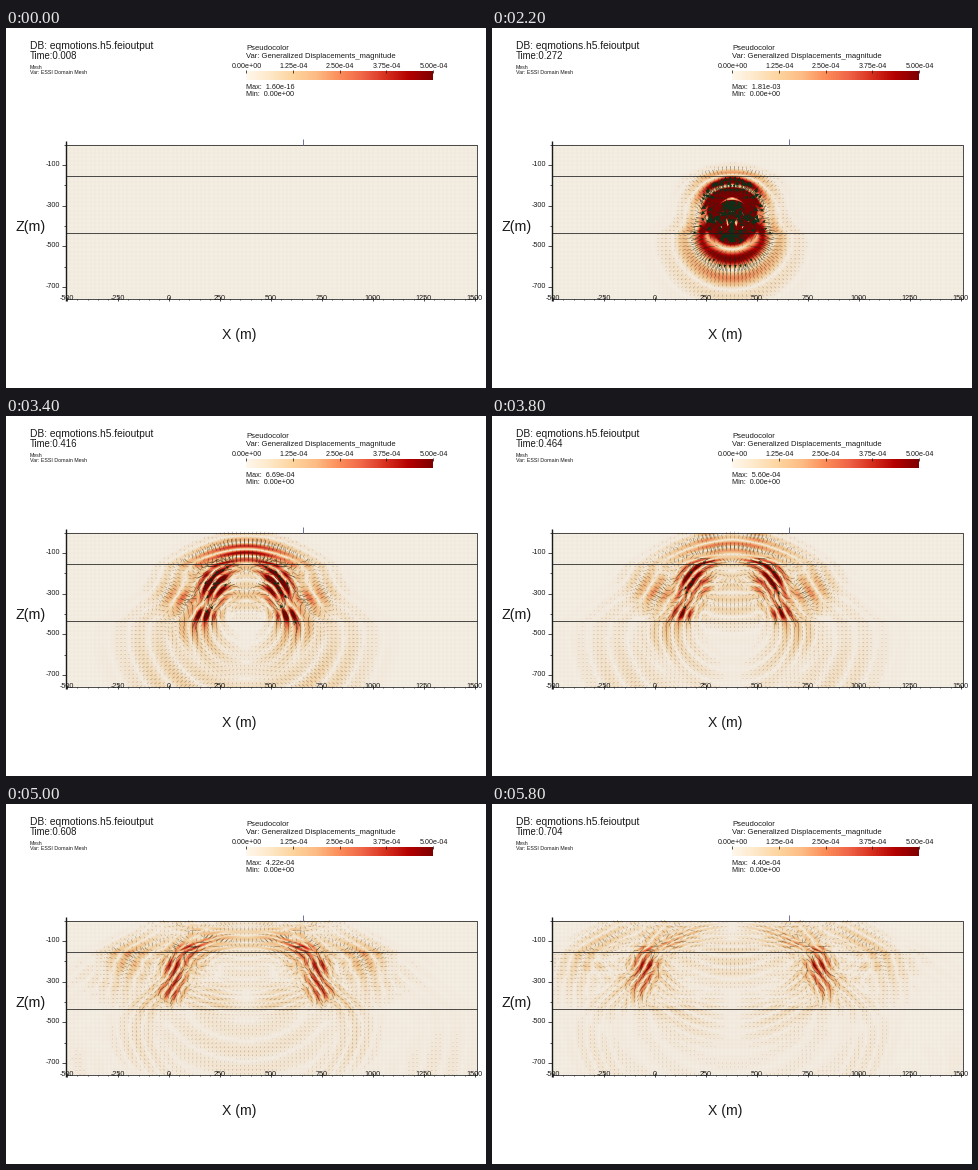
A matplotlib script for the animation above (6 s loop, 480 px wide and 360 px high).

```python
import numpy as np
import matplotlib.pyplot as plt
from matplotlib.animation import FuncAnimation
from matplotlib.collections import LineCollection, PolyCollection

W, H, DPI = 480, 360, 100
FRAMES, STEP_MS = 30, 200
X0, X1, Y0, Y1 = 60, 471, 117, 271      # section, in pixels
LAYERS = (147.5, 205)                   # depths of the interfaces
SRC = (239.5, 192)
NX, NZ, PAD = X1 - X0, Y1 - Y0, 30
SUB = 20                                # solver steps per frame
VMAX = 5e-4
CMAP = plt.get_cmap("OrRd")
INK = "#1a1a1a"

# peak displacement over time, interpolated in log space
PEAK_T = [0, 1, 2, 4, 7, 11, 15, 19, 25, 29]
PEAK_V = [1.6e-16, 4.2e-6, 5.1e-5, 6.3e-4, 1.99e-3, 1.81e-3,
          7.99e-4, 5.6e-4, 4.22e-4, 4.4e-4]


def peak(n):
    return np.exp(np.interp(n, PEAK_T, np.log(PEAK_V)))


def fwd(a, axis):
    return np.roll(a, -1, axis) - a


def back(a, axis):
    return a - np.roll(a, 1, axis)


def simulate():
    """Elastic waves in three layers under a free surface (staggered grid)."""
    rows, cols = NZ + PAD, NX + 2 * PAD
    z, x = np.mgrid[:rows, :cols].astype(np.float32)
    py, px = z + Y0, x + X0 - PAD

    def layered(top, mid, low):
        zones = [py < LAYERS[0], py < LAYERS[1]]
        return np.select(zones, [top, mid], low).astype(np.float32)

    stiff = layered(4.6, 7.8, 13.0) ** 2
    mu = layered(2.5, 4.7, 7.5) ** 2
    keep = 1 - layered(0.25, 0.0, 0.15) / SUB
    lam = stiff - 2 * mu
    top = (4 * mu * (lam + mu) / stiff)[0]

    blob = np.exp(-((px - SRC[0]) / 2.4) ** 2 / 2
                  - ((py - SRC[1]) / 2.8) ** 2 / 2)
    edge = np.maximum.reduce([PAD - x, x - (cols - 1 - PAD),
                              z - NZ, np.zeros_like(z)])
    sponge = np.exp(-(0.01 * edge) ** 2)

    ux, uz, ox, oz = (np.zeros((rows, cols), np.float32) for _ in range(4))
    dt2 = np.float32(1 / SUB ** 2)
    shots = []
    for k in range((FRAMES - 1) * SUB + 1):
        if k % SUB == 0:
            cx = (ux + np.roll(ux, 1, 1)) / 2
            cz = (uz + np.roll(uz, 1, 0)) / 2
            cz[0] = uz[0]
            shots.append((cx[:NZ, PAD:-PAD].copy(), cz[:NZ, PAD:-PAD].copy()))
        t = k / SUB - 7.6
        pulse = np.float32(np.cos(2 * np.pi * t / 3)
                           * np.exp(-(t / 1.8) ** 2 / 2))
        exx, ezz = back(ux, 1), back(uz, 0)
        sxx = stiff * exx + lam * ezz - 0.1 * pulse * blob
        szz = lam * exx + stiff * ezz - pulse * blob
        sxx[0], szz[0] = top * exx[0], 0
        sxz = mu * (fwd(ux, 0) + fwd(uz, 1))
        sxz[-1] = 0
        ax = fwd(sxx, 1) + back(sxz, 0)
        ax[0] += sxz[0]
        az = back(sxz, 1) + fwd(szz, 0)
        nx = ux + keep * (ux - ox) + dt2 * ax
        nz = uz + keep * (uz - oz) + dt2 * az
        ox, oz, ux, uz = ux * sponge, uz * sponge, nx * sponge, nz * sponge
    return shots


def scaled(shot, n):
    ux, uz = shot
    size = np.hypot(ux, uz).max()
    f = peak(n) / size if size > 0 else 0
    return ux * f, uz * f


FIELD = [scaled(s, n) for n, s in enumerate(simulate())]

fig = plt.figure(figsize=(W / DPI, H / DPI), dpi=DPI, facecolor="white")
ax = fig.add_axes([0, 0, 1, 1])
ax.set_xlim(0, W)
ax.set_ylim(H, 0)
ax.axis("off")


def label(x, y, text, px, ha="left"):
    return ax.text(x, y + 0.6, text, fontsize=px * 72 / DPI, ha=ha,
                   va="center", family="Liberation Sans", color=INK, zorder=8)


def line(xs, ys, lw=0.55, color=INK, z=6):
    ax.plot(xs, ys, color=color, lw=lw, zorder=z, solid_capstyle="butt")


# header and colour bar
label(24, 17.6, "DB: eqmotions.h5.feioutput", 10.3)
clock = label(24, 27.3, "", 9.6)
label(24, 39, "Mesh", 5.3)
label(24, 44, "Var: ESSI Domain Mesh", 5.3)
label(240, 20.3, "Pseudocolor", 7.6)
label(240, 28, "Var: Generalized Displacements_magnitude", 7.7)
high = label(240, 59, "", 7.3)
label(240, 66.2, "Min:  0.00e+00", 7.3)
ax.imshow(np.linspace(0, 1, 256)[None], cmap=CMAP, aspect="auto",
          extent=(240, 427, 52, 43.5), zorder=2)
for i in range(5):
    x = 240 + i * 46.75
    line([x, x], [42, 44.5])
    label(x + 0.5, 38, f"{i * 1.25e-4:.2e}", 7.2, "center")

# section frame, layers and axes
line([X0, X1, X1, X0], [Y0, Y0, Y1, Y1])
line([59.5, 59.5], [113, 273], 1)
for y in LAYERS:
    line([X0, X1], [y, y])
line([297, 297], [111, 117], 0.7, "#6c74a0")
for i in range(8):
    y = 116.7 + i * 20.3
    line([56 if i % 2 else 57.5, 60], [y, y])
    if i % 2:
        label(54.5, y - 1, f"-{i * 100}", 7.3, "right")
for i in range(9):
    x = 61.2 + i * 50.95
    line([x, x], [Y1 - 2, Y1 + 2])
    label(x, 270, str(250 * i - 500), 7.3, "center")
    for m in range(1, 5):
        if i < 8:
            line([x + m * 10.19] * 2, [Y1, Y1 + 1.2], 0.5)
label(9, 198, "Z(m)", 14.3)
label(216, 306, "X (m)", 14)

# mesh
SHADE = 0.96
image = ax.imshow(np.ones((NZ, NX, 3)), extent=(X0, X1, Y1, Y0),
                  aspect="auto", interpolation="bilinear", zorder=1)
mesh = [[(x, Y0), (x, Y1)] for x in np.arange(X0, X1, 4.1)]
mesh += [[(X0, y), (X1, y)] for y in np.arange(Y0, Y1, 4.1)]
ax.add_collection(LineCollection(mesh, colors="#8a7c66", lw=0.3, alpha=0.08,
                                 zorder=2))

# displacement vectors
GAP = 4
gz, gx = np.mgrid[1:NZ:GAP, 2:NX:GAP]
PALE, DARK = np.array([0.5, 0.36, 0.2]), np.array([0.14, 0.14, 0.08])
shafts = ax.add_collection(LineCollection([], lw=0.45, zorder=4))
heads = ax.add_collection(PolyCollection([], facecolors="#0d3019",
                                         edgecolors="none", zorder=5))


def draw(n):
    ux, uz = FIELD[n]
    mag = np.hypot(ux, uz)
    image.set_data(CMAP(np.clip(mag / VMAX, 0, 1))[..., :3] * SHADE)

    m = mag[gz, gx]
    on = m > 1e-5
    m = m[on]
    vec = np.stack([ux[gz, gx][on], uz[gz, gx][on]], 1) / m[:, None]
    size = 23 * (m / 2e-3) ** 0.65
    tail = np.stack([gx[on] + X0 + 0.5, gz[on] + Y0 + 0.5], 1)
    tip = tail + vec * size[:, None]
    tip[:, 1] = np.clip(tip[:, 1], Y0 - 2, Y1 + 1)
    shafts.set_segments(np.stack([tail, tip], 1))
    tint = np.clip(m / 3e-4, 0, 1)[:, None]
    rgb = PALE + (DARK - PALE) * tint
    shafts.set_color(np.hstack([rgb, 0.4 + 0.35 * tint]))

    big = size > 9
    h = (size[big] * 0.3)[:, None]
    v, p = vec[big], tip[big]
    side = np.stack([-v[:, 1], v[:, 0]], 1) * h * 0.5
    heads.set_verts(list(np.stack([p, p - v * h + side, p - v * h - side], 1)))

    clock.set_text(f"Time:{0.008 + 0.024 * n:.3f}")
    high.set_text(f"Max:  {peak(n):.2e}")
    return image, shafts, heads, clock, high


anim = FuncAnimation(fig, draw, frames=FRAMES, init_func=lambda: (),
                     interval=STEP_MS, repeat=True, repeat_delay=0)
plt.show()
```
